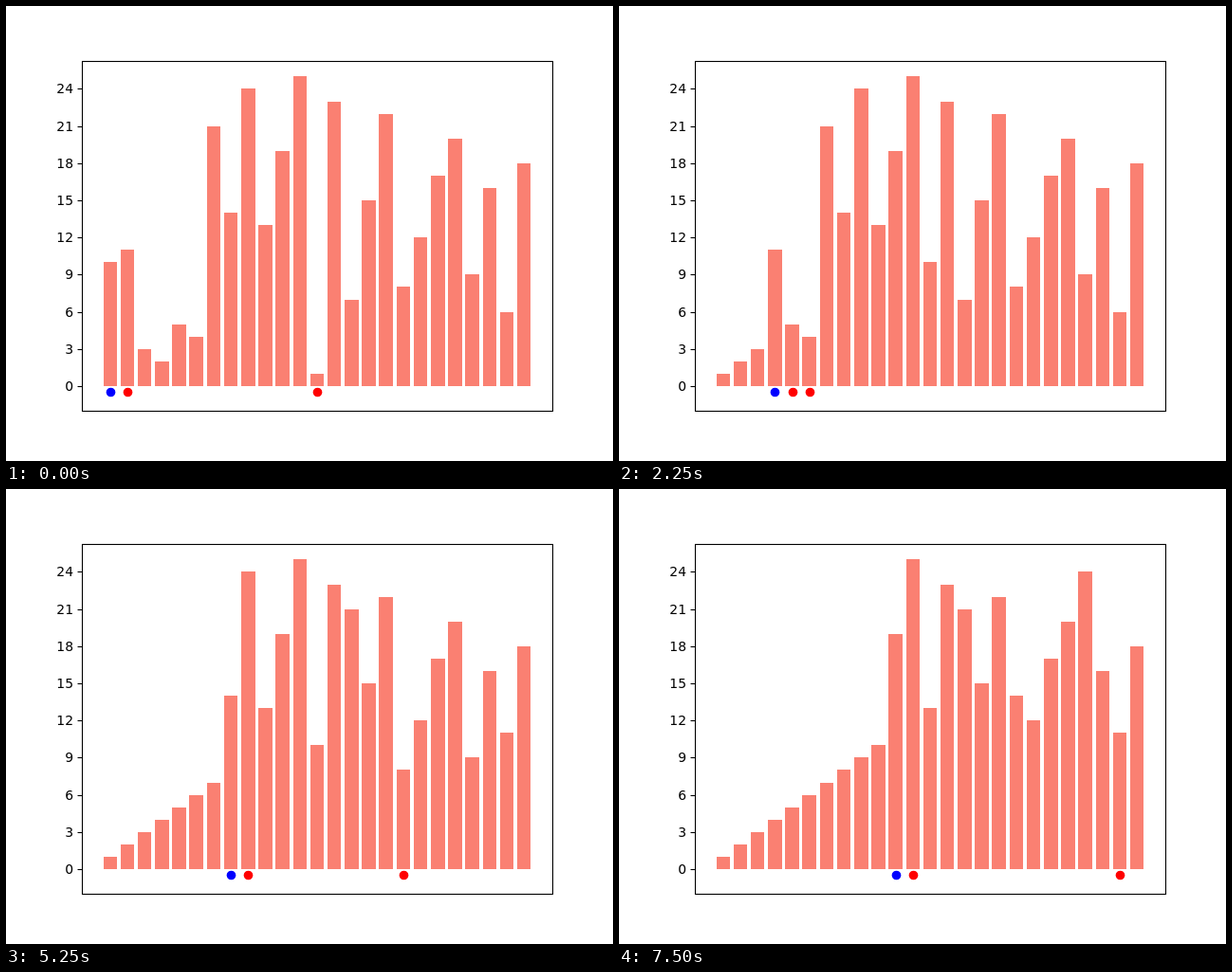
Recreate the animation shown at these times as an HTML page with a canvas. Size 640 by 480 pixels, loop 8000 ms.

```html
<!DOCTYPE html>
<html lang="en">
<head>
<meta charset="utf-8">
<title>Selection sort</title>
<style>
  html, body { margin: 0; width: 100%; height: 100%; overflow: hidden; background: #fff; }
  canvas { display: block; width: 640px; height: 480px; }
</style>
</head>
<body>
<canvas id="stage" width="640" height="480"></canvas>
<script>
const ctx = document.getElementById('stage').getContext('2d');
const START = [10, 11, 3, 2, 5, 4, 21, 14, 24, 13, 19, 25, 1,
  23, 7, 15, 22, 8, 12, 17, 20, 9, 16, 6, 18];
const LOOP = 8000, STEP = 750;
const BOX = { left: 80.5, top: 58.5, right: 576.5, bottom: 427.5 };
const COL = 496 / 27.28, ROW = 13.065, ZERO = 401;
const BAR = 0.8, DOT_R = 4.86, DOT_Y = 407.5;

const xAt = i => 80 + (i + 1.64) * COL;
const yAt = v => Math.round(ZERO - v * ROW);

// Index of the smallest value from position i onwards.
function minFrom(a, i) {
  let m = i;
  for (let j = i + 1; j < a.length; j++) if (a[j] < a[m]) m = j;
  return m;
}

// Values after the given number of selection sort passes.
function sortedBy(passes) {
  const a = START.slice();
  for (let i = 0; i < passes; i++) {
    const m = minFrom(a, i);
    [a[i], a[m]] = [a[m], a[i]];
  }
  return a;
}

function drawBar(v, i) {
  const left = Math.round(xAt(i - BAR / 2));
  const right = Math.round(xAt(i + BAR / 2));
  ctx.fillRect(left, yAt(v), right - left, ZERO - yAt(v));
}

function drawDot(i, color) {
  ctx.fillStyle = color;
  ctx.beginPath();
  ctx.arc(Math.round(xAt(i)) + 0.5, DOT_Y, DOT_R, 0, 2 * Math.PI);
  ctx.fill();
}

function drawAxes() {
  ctx.strokeStyle = ctx.fillStyle = '#000';
  ctx.lineWidth = 1.11;
  ctx.strokeRect(BOX.left, BOX.top, BOX.right - BOX.left, BOX.bottom - BOX.top);
  ctx.font = '13.89px "DejaVu Sans", sans-serif';
  ctx.textAlign = 'right';
  for (let v = 0; v <= 24; v += 3) {
    const y = yAt(v);
    ctx.beginPath();
    ctx.moveTo(75.5, y + 0.5);
    ctx.lineTo(BOX.left, y + 0.5);
    ctx.stroke();
    ctx.fillText(v, 71, y + 5);
  }
}

function draw(pass) {
  const a = sortedBy(pass);
  ctx.fillStyle = '#fff';
  ctx.fillRect(0, 0, 640, 480);
  ctx.fillStyle = '#fa8072';
  a.forEach(drawBar);
  drawDot(pass, '#00f');
  drawDot(pass + 1, '#f00');
  drawDot(minFrom(a, pass), '#f00');
  drawAxes();
}

const begin = performance.now();
function tick() {
  draw(Math.floor((performance.now() - begin) % LOOP / STEP));
  requestAnimationFrame(tick);
}
tick();
</script>
</body>
</html>
```
